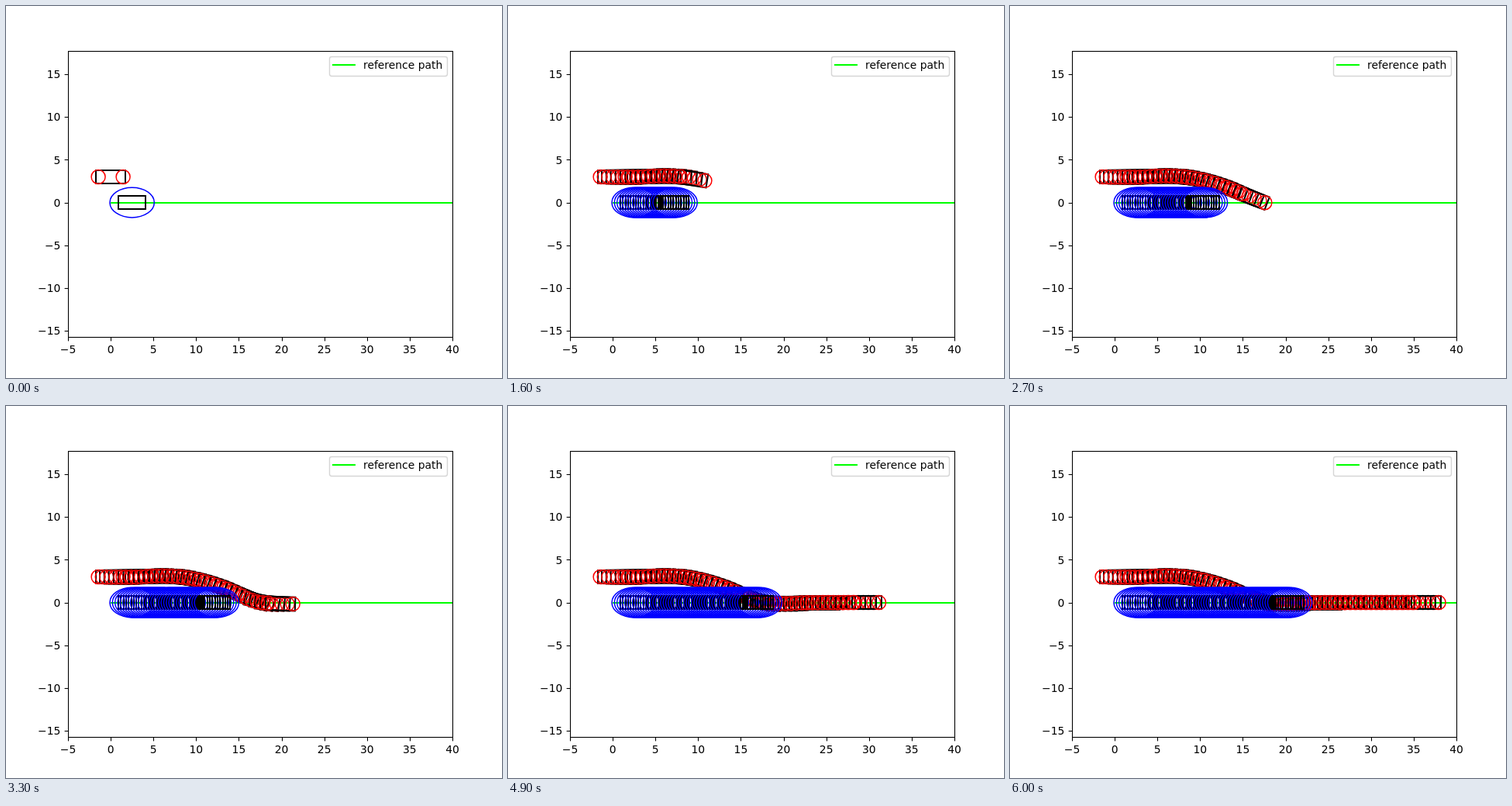
Animation of 640 by 480 pixels, one loop 6100 ms. Source, as an HTML page:

```html
<!DOCTYPE html>
<html lang="en">
<head>
<meta charset="utf-8">
<title>Path tracking</title>
<style>
  html, body { margin: 0; width: 100%; height: 100%; overflow: hidden; background: #fff; }
  svg { display: block; width: 640px; height: 480px; }
  text { font: 13.89px "DejaVu Sans", sans-serif; fill: #000; }
</style>
</head>
<body>
<svg id="plot" viewBox="0 0 640 480">
  <defs><clipPath id="area"><rect x="80" y="57.6" width="496" height="369.6"/></clipPath></defs>
  <g clip-path="url(#area)">
    <path d="M135.1 254H576" stroke="#0f0" stroke-width="2.08"/>
    <g id="trail" fill="none"></g>
  </g>
  <rect x="80.5" y="58.5" width="496" height="369" fill="none" stroke="#000" stroke-width="1.1"/>
  <g id="axes"></g>
  <rect x="417.5" y="65.5" width="152" height="25" rx="2.8" fill="#fff" fill-opacity=".8" stroke="#ccc" stroke-opacity=".8" stroke-width="1.39"/>
  <path d="M421 76H451" stroke="#0f0" stroke-width="2.08"/>
  <text x="461" y="81">reference path</text>
</svg>
<script>
const STEP = 100, COUNT = 61;
const UNIT = 496 / 45, X0 = 80 + 5 * UNIT, Y0 = 253.6;
const axes = document.getElementById('axes');
const trail = document.getElementById('trail');

function add(parent, tag, attrs, text) {
  const el = document.createElementNS('http://www.w3.org/2000/svg', tag);
  for (const key in attrs) el.setAttribute(key, attrs[key]);
  if (text) el.textContent = text;
  parent.appendChild(el);
  return el;
}

const label = v => String(v).replace('-', '\u2212');
const snap = v => Math.floor(v + 0.5) + 0.5;

for (let v = -5; v <= 40; v += 5) {
  const x = X0 + v * UNIT;
  add(axes, 'path', { d: `M${snap(x)} 427.5v4.9`, stroke: '#000', 'stroke-width': 1.1 });
  add(axes, 'text', { x, y: 448, 'text-anchor': 'middle' }, label(v));
}
for (let v = -15; v <= 15; v += 5) {
  const y = Y0 - v * UNIT;
  add(axes, 'path', { d: `M80.5 ${snap(y)}h-4.9`, stroke: '#000', 'stroke-width': 1.1 });
  add(axes, 'text', { x: 70.4, y: y + 5.1, 'text-anchor': 'end' }, label(v));
}

// Lane change: step, centre y, heading in degrees (downward positive)
const course = [
  [0, 220.5, 0], [4, 220.5, -0.8], [8, 220, -2.5], [11, 219.6, 0], [13, 220.2, 3],
  [16, 222.8, 9], [20, 229.4, 16], [24, 239.7, 21], [27, 248, 21], [28, 250.3, 18],
  [29, 252, 13], [30, 253.3, 9], [31, 254.2, 5], [33, 254.9, 2], [36, 254.6, -1],
  [40, 253.8, 0], [44, 253.6, 0], [60, 253.6, 0]
];

function sample(n, col) {
  let i = 0;
  while (i < course.length - 2 && n >= course[i + 1][0]) i++;
  const slope = k => {
    const a = course[Math.max(k - 1, 0)], b = course[Math.min(k + 1, course.length - 1)];
    return (b[col] - a[col]) / (b[0] - a[0]);
  };
  const [p, q] = [course[i], course[i + 1]];
  const h = q[0] - p[0], u = (n - p[0]) / h, w = 1 - u;
  return w * w * (1 + 2 * u) * p[col] + u * u * (3 - 2 * u) * q[col]
    + h * u * w * (w * slope(i) - u * slope(i + 1));
}

function box(parent, x, y, hx, hy, deg) {
  const level = Math.abs(deg) < 0.2;
  const r = level ? Math.round : v => v;
  const l = r(x - hx), t = r(y - hy);
  add(parent, 'rect', {
    x: l, y: t, width: r(x + hx) - l, height: r(y + hy) - t,
    stroke: '#000', 'stroke-width': 2,
    transform: level ? '' : `rotate(${deg} ${x} ${y})`
  });
}

function car(parent, n) {
  const y = sample(n, 1), deg = sample(n, 2), a = deg * Math.PI / 180;
  const front = 151.1 + 6.8 * n - 6 * (1 - Math.exp(-n / 3))
    + 1.1 * Math.exp(-(((n - 39) / 8) ** 2));
  const dx = 16 * Math.cos(a), dy = 16 * Math.sin(a), x = front - dx;
  box(parent, x, y, 19, 8.8, deg);
  for (const s of [-1, 1])
    add(parent, 'circle', { cx: x + s * dx, cy: y + s * dy, r: 9, stroke: '#f00', 'stroke-width': 1.5 });
}

function obstacle(parent, n) {
  const x = X0 + (2.5 + 0.3 * n) * UNIT;
  box(parent, x, Y0, 1.6 * UNIT, 0.8 * UNIT, 0);
  add(parent, 'ellipse', { cx: x, cy: Y0, rx: 2.6 * UNIT, ry: 1.75 * UNIT, stroke: '#00f', 'stroke-width': 1.5 });
}

const steps = Array.from({ length: COUNT }, (_, n) => {
  const g = add(trail, 'g', {});
  car(g, n);
  obstacle(g, n);
  return g;
});

const start = performance.now();
let shown = -1;
function tick() {
  const now = Math.floor(Math.max(0, performance.now() - start) / STEP) % COUNT;
  if (now !== shown) {
    steps.forEach((g, n) => { g.style.display = n <= now ? '' : 'none'; });
    shown = now;
  }
  requestAnimationFrame(tick);
}
tick();
</script>
</body>
</html>
```
